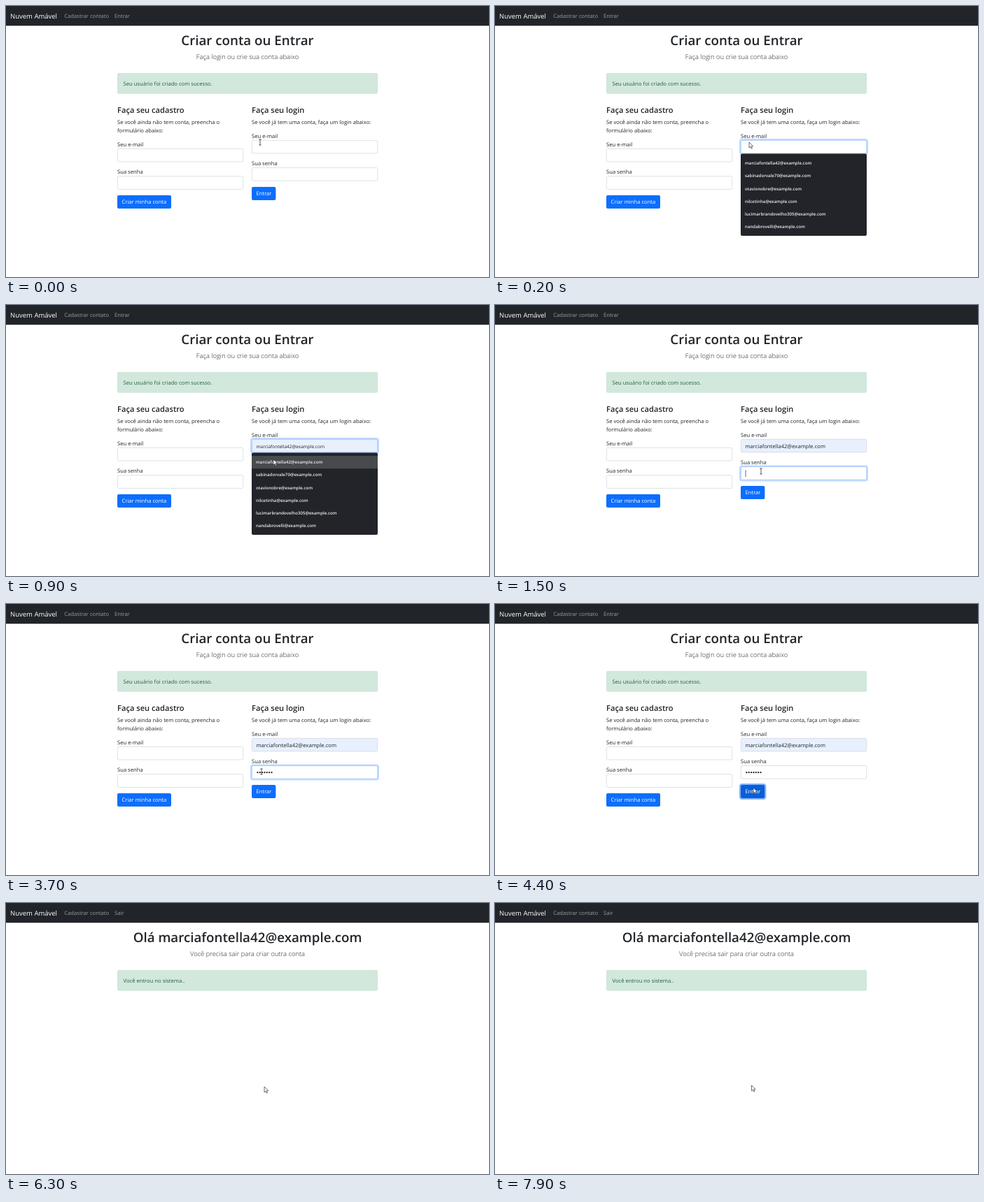
An HTML page that plays this animation: 690 by 388 pixels, repeating every 9.3 s.

```html
<!DOCTYPE html>
<html lang="pt-BR">
<head>
<meta charset="utf-8">
<title>Criar conta ou Entrar</title>
<style>
  html, body { margin: 0; width: 100%; height: 100%; overflow: hidden; background: #fff; }
  svg { display: block; width: 100vw; height: 100vh; }
  text { font: 7.65px "Open Sans", "Noto Sans", sans-serif; fill: #212529; text-rendering: geometricPrecision; }
  .h1 { font-size: 18.75px; font-weight: 600; text-anchor: middle; }
  .lead { font-size: 9.4px; font-weight: 300; text-anchor: middle; }
  .h4 { font-size: 11.15px; font-weight: 600; }
  .brand { font-size: 9.5px; fill: #fff; }
  .link { fill: #9b9d9f; }
  .ok { fill: #245f42; }
  .white { fill: #fff; }
  .option { font-size: 6.15px; font-weight: 600; fill: #eceef0; }
  .field { fill: #fff; stroke: #ced4da; stroke-width: .7; }
  .filled { fill: #e8f0fe; }
  .focus { stroke: #86b7fe; }
  .ring { fill: none; stroke: #0d6efd; stroke-opacity: .25; stroke-width: 2; }
  .button { fill: #0d6efd; }
  .hover { fill: #0b5ed7; }
</style>
</head>
<body>
<svg viewBox="0 0 690 388">
  <rect width="690" height="28.3" fill="#212529"/>
  <text class="brand" x="6" y="18">Nuvem Amável</text>
  <text class="link" x="83.3" y="17.3">Cadastrar contato</text>
  <text class="link" x="155" y="17.3" id="navLink"></text>
  <text class="h1" x="345" y="56" id="title"></text>
  <text class="lead" x="345" y="76.2" id="lead"></text>
  <rect x="159.3" y="96.3" width="371.5" height="29" rx="2" fill="#d2e8dc" stroke="#c0dfcf" stroke-width=".6"/>
  <text class="ok" x="167.5" y="113.7" id="alert"></text>

  <g id="forms">
    <text class="h4" x="159" y="153.3">Faça seu cadastro</text>
    <text x="159" y="168.8">Se você ainda não tem conta, preencha o</text>
    <text x="159" y="180.8">formulário abaixo:</text>
    <text x="159" y="200.8">Seu e-mail</text>
    <rect class="field" x="159.3" y="204.4" width="179.5" height="18.6" rx="2"/>
    <text x="159" y="240.4">Sua senha</text>
    <rect class="field" x="159.3" y="243.8" width="179.5" height="18.6" rx="2"/>
    <rect class="button" x="159" y="271" width="77" height="19" rx="2"/>
    <text class="white" x="165.5" y="283.4">Criar minha conta</text>

    <text class="h4" x="351" y="153.3">Faça seu login</text>
    <text x="351" y="168.8">Se você já tem uma conta, faça um login abaixo:</text>
    <text x="351" y="188.8">Seu e-mail</text>
    <rect class="ring" id="mailRing" x="350" y="191" width="182" height="21" rx="3"/>
    <rect class="field" id="mail" x="351.3" y="192.3" width="179.5" height="18.6" rx="2"/>
    <text x="357.5" y="204.6" id="mailText"></text>
    <text x="351" y="228.4">Sua senha</text>
    <rect class="ring" id="passRing" x="350" y="230.4" width="182" height="21" rx="3"/>
    <rect class="field" id="pass" x="351.3" y="231.6" width="179.5" height="18.6" rx="2"/>
    <g id="dots"></g>
    <path id="caret" d="M0 236.5V246" stroke="#212529" stroke-width=".7"/>
    <rect class="ring" id="enterRing" x="350" y="258" width="36.4" height="21" rx="3" style="stroke-opacity:.5"/>
    <rect class="button" id="enter" x="351" y="259" width="34.4" height="19" rx="2"/>
    <text class="white" x="357.5" y="271.2">Entrar</text>

    <g id="menu">
      <rect x="351" y="211.5" width="180" height="117.5" rx="2" fill="#222429"/>
      <rect id="row" x="351" y="216" width="180" height="18.2" fill="#484b4d"/>
    </g>
  </g>

  <g id="pointer">
    <path id="arrow" d="M0 0V8L1.9 6.3 3.2 9.2 4.5 8.6 3.2 5.8H5.7Z" fill="#fff" stroke="#333" stroke-width=".7" stroke-linejoin="round"/>
    <path id="beam" d="M-1.7-4H1.7M0-4V4M-1.7 4H1.7" fill="none" stroke="#333" stroke-width=".8"/>
  </g>
</svg>
<script>
const LOOP = 9300, STEP = 100, DOT_GAP = 3.35;
const user = 'marciafontella42@example.com';
const options = [user, 'sabinadorvale70@example.com', 'otavionobre@example.com',
  'nilcetinha@example.com', 'lucimarbrandovelho305@example.com', 'nandabrovelli@example.com'];
const keyTimes = [2100, 2300, 2500, 2600, 2800, 3000, 3100];

// Pointer stops: time, x, y
const path = [[0, 363, 195], [200, 363, 195], [500, 381, 220], [700, 381, 220], [800, 382, 221],
  [1100, 382, 221], [1500, 380, 238], [3600, 380, 238], [3700, 365, 240], [4000, 368, 256],
  [4200, 369, 263], [6400, 369, 263], [7200, 366.5, 261], [LOOP, 366.5, 261]];

const $ = id => document.getElementById(id);
const show = (id, on) => $(id).style.display = on ? '' : 'none';
const mark = (id, name, on) => $(id).classList.toggle(name, on);
const write = (id, text) => { if ($(id).textContent !== text) $(id).textContent = text; };

function add(parent, tag, attrs, text = '') {
  const el = document.createElementNS('http://www.w3.org/2000/svg', tag);
  for (const name in attrs) el.setAttribute(name, attrs[name]);
  el.textContent = text;
  return $(parent).appendChild(el);
}

options.forEach((mail, i) => add('menu', 'text', { class: 'option', x: 357, y: 227.2 + i * 18.2 }, mail));
const dots = keyTimes.map((_, i) =>
  add('dots', 'circle', { cx: 359.4 + i * DOT_GAP, cy: 241.2, r: 1.15, fill: '#212529' }));

function pointerAt(t) {
  const i = path.findIndex(stop => stop[0] > t);
  const [t0, x0, y0] = path[i - 1], [t1, x1, y1] = path[i];
  const k = (t - t0) / (t1 - t0);
  return [x0 + (x1 - x0) * k, y0 + (y1 - y0) * k];
}

function draw(t) {
  const between = (from, to) => t >= from && t < to;
  const logged = t >= 6300, menu = between(200, 1000), filled = t >= 400;
  const passFocus = between(1400, 4400), pressed = t >= 4400;
  const typed = keyTimes.filter(time => t >= time).length;
  const [x, y] = pointerAt(t);

  write('navLink', logged ? 'Sair' : 'Entrar');
  write('title', logged ? 'Olá ' + user : 'Criar conta ou Entrar');
  write('lead', logged ? 'Você precisa sair para criar outra conta' : 'Faça login ou crie sua conta abaixo');
  write('alert', logged ? 'Você entrou no sistema..' : 'Seu usuário foi criado com sucesso.');
  show('forms', !logged);

  const mailFocus = between(100, 1400);
  show('mailRing', mailFocus);
  mark('mail', 'focus', mailFocus);
  mark('mail', 'filled', filled);
  write('mailText', filled ? user : '');
  $('mailText').style.fontSize = t < 1000 ? '6.5px' : '';
  show('menu', menu);
  show('row', filled);

  show('passRing', passFocus);
  mark('pass', 'focus', passFocus);
  dots.forEach((dot, i) => dot.style.display = i < typed ? '' : 'none');
  show('caret', between(1400, 1900) || between(2100, 3700));
  $('caret').setAttribute('transform', `translate(${358.1 + typed * DOT_GAP})`);

  show('enterRing', pressed);
  mark('enter', 'hover', between(4100, 6300));

  const overField = !logged && !menu && (y < 211 || (y > 231 && y < 251));
  show('beam', overField);
  show('arrow', !overField);
  $('pointer').setAttribute('transform', `translate(${x} ${y})`);
}

const start = performance.now();
function tick() {
  const t = (performance.now() - start) % LOOP;
  draw(Math.floor(t / STEP) * STEP);
  requestAnimationFrame(tick);
}
tick();
</script>
</body>
</html>
```
